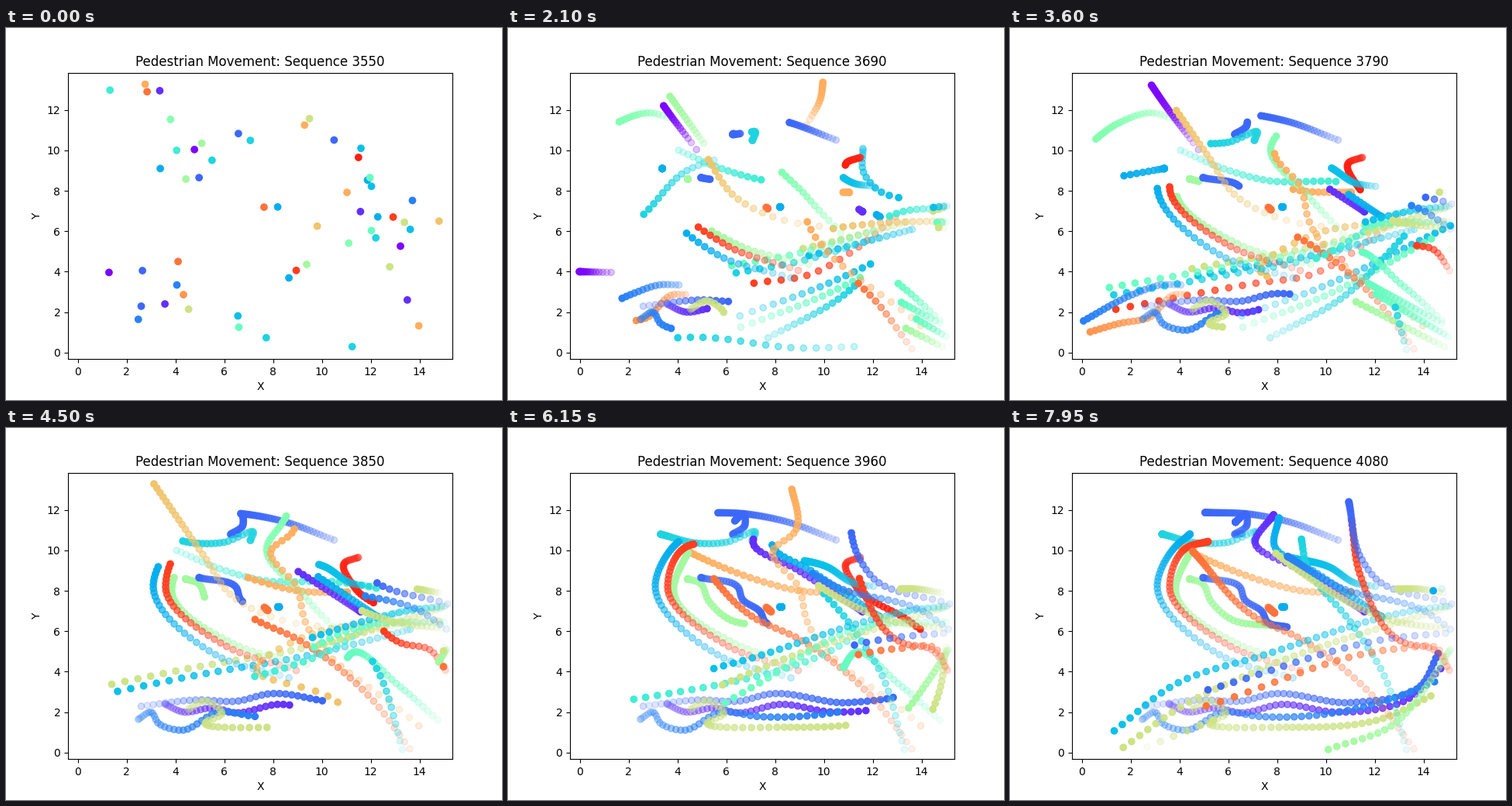
A matplotlib script that plays this animation: 640x480 px, repeating every 8 s.

```python
import numpy as np
import matplotlib.pyplot as plt
from matplotlib.animation import FuncAnimation

STEP_FRAMES = 3          # animation frames per data step
FRAMES, INTERVAL = 160, 50
LAST = 53                # final data step

# Positions on the rainbow colormap
PURPLE, INDIGO, BLUE, ROYAL = .01, .06, .135, .17
AZURE, SKY, CYAN, TURQ = .24, .27, .31, .375
MINT, SPRING, GREEN, LIME = .45, .51, .57, .65
KHAKI, ORANGE, APRICOT, CORAL = .72, .76, .8, .85
TOMATO, RED = .92, .96

walkers = []


def curve(points, u):
    """Smooth path through the points; u in 0..1 is the share of its length."""
    chord = np.r_[0, np.cumsum(np.hypot(*np.diff(points, axis=0).T))]
    slope = np.gradient(points, chord, axis=0)
    s = u * chord[-1]
    i = np.clip(np.searchsorted(chord, s, side="right") - 1, 0, len(chord) - 2)
    h = (chord[i + 1] - chord[i])[:, None]
    v = (s - chord[i])[:, None] / h
    return (points[i] * (1 + 2 * v) * (1 - v) ** 2 + h * slope[i] * v * (1 - v) ** 2
            + points[i + 1] * v * v * (3 - 2 * v) + h * slope[i + 1] * v * v * (v - 1))


def walk(tone, first, last, *points, gain=1, brake=1, moving=None):
    """Add a walker seen from first to last step.

    gain speeds the walker up, brake slows it down; with moving=(a, b) it
    stands, eases along the path between steps a and b, and stands again.
    """
    step = np.arange(first, last + 1)
    if moving:
        u = np.clip((step - moving[0]) / (moving[1] - moving[0]), 0, 1)
        u = u * u * (3 - 2 * u)
    else:
        u = 1 - (1 - ((step - first) / (last - first)) ** gain) ** brake
    walkers.append((first, curve(np.array(points, float), u), plt.cm.rainbow(tone)))


def group(members, first, last, *points, **timing):
    """Walkers side by side: the same path shifted by (dx, dy) for each."""
    for tone, dx, dy in members:
        walk(tone, first, last, *[(x + dx, y + dy) for x, y in points], **timing)


def leave(tone, x, y, steps=4, speed=.3):
    """Straight away from the middle of the square."""
    away = np.array([x - 7.5, y - 6.5])
    away *= steps * speed / np.hypot(*away)
    walk(tone, 0, steps, (x, y), (x + away[0], y + away[1]))


# Gone within moments
leave(TURQ, 1.32, 12.98)
leave(ORANGE, 2.76, 13.27)
leave(ROYAL, 13.71, 7.52)
leave(PURPLE, 13.22, 5.26)
leave(BLUE, 2.65, 4.05)
leave(INDIGO, 13.5, 2.6)

# Upper left
walk(CORAL, 0, 11, (2.84, 12.9), (2.52, 13.48), brake=2)
walk(INDIGO, 0, 11, (3.36, 12.95), (3.26, 13.5), brake=2)
walk(SPRING, 0, 27, (3.8, 11.53), (2.95, 11.85), (1.48, 11.33), (.3, 10.3), gain=.85)
walk(TURQ, 0, 39, (4.05, 10), (5.73, 9.13), (7.54, 8.52), (10.5, 8.45), (15, 7.4), gain=1.1)
walk(PURPLE, 0, 27, (4.78, 10.04), (3.38, 12.3), (2.7, 13.5), gain=.7)
walk(GREEN, 0, 19, (5.08, 10.35), (3.2, 13.5))
walk(CYAN, 0, 22, (5.5, 9.51), (4.55, 9.1), (2.52, 6.73), (.6, 5), gain=1.15)
walk(GREEN, 0, LAST, (4.43, 8.58), (4.9, 8.4), (5.28, 7.5), (6.1, 6.6), (8.05, 6.26),
     moving=(18, LAST))
walk(BLUE, 0, LAST, (4.97, 8.65), (6.5, 8.15), (6.65, 7.6), (7.4, 6.95), (7.6, 6.45),
     (8.4, 6.2), moving=(6, LAST))
walk(AZURE, 0, 29, (3.38, 9.1), (.6, 8.5), moving=(15, 31))
walk(BLUE, 0, LAST, (6.58, 10.83), (6.27, 10.78), (6.75, 11.2), (6.7, 11.8), (6.3, 11.4),
     moving=(0, 46))
walk(CYAN, 0, LAST, (7.07, 10.49), (7.2, 10.87), (6, 10.4), (4.78, 10.36), (3.3, 10.8),
     moving=(4, 42))

# Upper right
walk(ORANGE, 0, 16, (9.29, 11.25), (9.86, 12.55), (9.98, 13.6), gain=.75)
walk(LIME, 0, 11, (9.49, 11.57), (10.1, 12.8), gain=.7)
walk(BLUE, 0, LAST, (10.5, 10.51), (8.37, 11.45), (6.81, 11.8), (5.05, 11.87), brake=1.5)
walk(SKY, 0, 18, (11.6, 10.1), (11.63, 8.9), (12.1, 8.15), (15, 7.4), gain=1.8)
walk(RED, 0, 47, (11.5, 9.65), (10.94, 9.4), (11.32, 8.2), (13.38, 6.6), (14.2, 5.95),
     (15.3, 5.8), gain=1.75)
group([(AZURE, 0, 0), (MINT, .1, .12)], 0, 10, (11.87, 8.53), (14.85, 7.5))
walk(SKY, 0, LAST, (12.03, 8.22), (11.28, 8.35), (10.1, 9.2), (8.5, 9.65), gain=.8)
walk(ORANGE, 0, LAST, (11.03, 7.92), (9, 8), (7.5, 8.45), (5.25, 9.48), (4.1, 10.15),
     moving=(10, 47))

# Centre
walk(CORAL, 0, LAST, (7.63, 7.19), (7.9, 6.9))
walk(AZURE, 0, LAST, (8.19, 7.2), (8.3, 7.2))
walk(KHAKI, 0, 31, (9.81, 6.25), (8.8, 6.42), (6.3, 7.77), (5.22, 9.63), (3, 13.5), gain=.72)
walk(INDIGO, 0, LAST, (11.58, 6.97), (8.9, 9.05), (7.1, 10.4), (7.86, 11.76),
     moving=(10, LAST))
walk(AZURE, 0, LAST, (12.29, 6.71), (9.4, 9.05), (7.9, 10.2), (8.08, 11.6),
     moving=(10, LAST))
walk(TOMATO, 0, 25, (12.92, 6.7), (11.1, 4.95), (9.4, 3.85), (7.19, 3.44), (.8, 2), gain=1.15)
group([(LIME, 0, 0), (SKY, .24, -.35)], 0, 32, (13.38, 6.44), (9.48, 5.23), (4.4, 4.12),
      (.3, 3.1), gain=1.35)
walk(KHAKI, 0, 37, (14.8, 6.5), (12.1, 6.38), (9.66, 5.9), (7.3, 4.1), (10.3, 2.75),
     (13.15, -.3), gain=1.3)
group([(MINT, 0, 0), (CYAN, .18, -.36)], 0, 25, (12.03, 6.03), (9.03, 4.93), (6.14, 4.28),
      (.6, 3.1), gain=1.15)
walk(SPRING, 0, 40, (11.1, 5.41), (9.29, 7.73), (7.75, 10.2), (8.4, 11.4), (9.2, 13.3), gain=.72)
walk(LIME, 0, 10, (12.78, 4.24), (12.87, 4.25))
walk(GREEN, 0, LAST, (9.38, 4.36), (6.43, 5.35), (3.85, 8), (4.4, 9.8), (4.65, 10.3), brake=2)
walk(TOMATO, 0, LAST, (8.95, 4.06), (6.02, 5.3), (3.6, 8.2), (4.4, 10.2), (5.17, 10.43), brake=2)
walk(AZURE, 0, LAST, (8.65, 3.69), (5.7, 4.8), (3.1, 8.4), (3.85, 10.2), (4.43, 10.8), brake=2)

# Lower left
walk(PURPLE, 0, 18, (1.28, 3.96), (-.05, 4), brake=2.5)
walk(CORAL, 0, 8, (4.11, 4.5), (2, 4.1), (-.05, 3.38))
walk(ROYAL, 0, 25, (4.06, 3.34), (3.3, 3.35), (2.24, 2.94), (-.1, 1.45), gain=1.1)
walk(INDIGO, 0, LAST, (3.57, 2.4), (4.25, 2.02), (5.6, 2.2), (6.4, 1.97), (8.2, 2.38),
     (10.4, 2), (13.3, 2.6), (14.7, 4.15), gain=1.45)
walk(APRICOT, 0, 25, (4.33, 2.86), (3.9, 2.88), (2.7, 1.7), (1.6, 1.45), (.15, .95), gain=1.1)
walk(BLUE, 0, LAST, (2.6, 2.29), (4.87, 2.6), (6.6, 2.55), (7.7, 2.88), (11.06, 2.47),
     (13.87, 3.28), (14.6, 4.9))
walk(ROYAL, 0, LAST, (2.48, 1.64), (3, 2), (3.3, 1.45), (4.2, 1.1), (5.8, 2), (7.3, 1.78),
     (12.45, 2.55), (14.45, 3.5), gain=1.5)
walk(LIME, 0, LAST, (4.54, 2.14), (5.2, 2.55), (5.9, 1.9), (5.3, 1.55), (8.4, 1.25),
     (12.43, 1.72), (14.3, 2.8), gain=1.5)
walk(SKY, 0, 24, (6.56, 1.81), (9.6, 3.13), (15.1, 6.27), gain=.9)
walk(MINT, 0, 25, (6.6, 1.25), (9.92, 2.78), (14.6, 5.8), gain=.9)
walk(CYAN, 0, 25, (7.72, .73), (10.66, 2.7), (13.4, 6))
walk(CYAN, 0, 21, (11.24, .29), (9, .22), (5, .75), (.4, .3))
walk(ORANGE, 0, 49, (13.97, 1.32), (9.28, 6.6), (9, 8.1), (7.92, 10), (8.8, 10.9),
     (8.62, 13.5), brake=1.9)

# From the lower right corner
walk(CORAL, 4, LAST, (13.6, .18), (12, 2.7), (9, 5.6), (7.1, 6.7), (4.55, 9.95), brake=1.5)
walk(MINT, 5, 41, (14.75, 1.6), (13.16, 3.3), (11.2, 4.9), (10.8, 4.2), brake=2)
walk(MINT, 5, 29, (14.75, 1.45), (11.3, 3.7), brake=1.3)
walk(GREEN, 7, 27, (14.85, .28), (10.6, 2.9))
walk(MINT, 7, 29, (15, .8), (11.2, 3.5))
walk(CYAN, 19, LAST, (13.3, .15), (12.35, 3.9), (11.1, 6.3), (9.15, 9.5), (9, 10.55), brake=1.3)

# From the right edge
walk(TURQ, 5, 46, (14.85, 7.13), (13.57, 7.05), (9.8, 4.75), (-.24, 2.07), gain=1.3)
walk(LIME, 11, LAST, (15, 7.2), (7.5, 4.2), (4.06, 2.25), (1.7, .25), gain=1.25)
walk(MINT, 12, 48, (15, 6.45), (11.7, 6.25), (7.38, 3.45), (3.4, .6), gain=1.25)
walk(SKY, 11, LAST, (15.05, 7.25), (14.3, 7.15), (7.4, 4.8), (3.87, 3.4), (1.33, 1.07), gain=1.25)
walk(LIME, 13, LAST, (14.9, 6.15), (13.2, 6.4), (8.6, 9.25), (7.95, 9.85))
walk(TOMATO, 16, LAST, (15.07, 4.05), (14.4, 5.1), (13.27, 5.4), (11.4, 8.8), (11.05, 11.5))
walk(ROYAL, 18, LAST, (15.1, 6.1), (14.1, 6.95), (10.5, 8.2), (8.43, 9.7), brake=1.6)
walk(BLUE, 21, LAST, (15.15, 7.35), (12, 8.65), (11.45, 9.6), (10.94, 12.4), brake=1.6)
walk(LIME, 23, LAST, (14.8, 7.9), (13.7, 8.1), (12.95, 8.08), brake=2.5)
walk(GREEN, 24, LAST, (15.1, 5.1), (14.36, 3.7), (12.7, 1.33), (10.1, .15), gain=1.5)
walk(LIME, 29, 48, (15, 5.2), (14.8, 3.35), (13.7, .1), gain=1.15)
walk(CORAL, 29, LAST, (15.05, 4.1), (14.5, 5.2), (13.15, 5.15), (5.1, 2.3), gain=1.35)
walk(BLUE, 33, LAST, (14.9, 5.9), (13.03, 5.7), (5.17, 3.1), gain=1.1)
walk(GREEN, 45, 48, (3.84, .28), (1.6, .8))
walk(LIME, 48, LAST, (2.67, .28), (5.4, 1.6))
walk(AZURE, 52, LAST, (14.75, 8.1), (14.4, 8))

fig, ax = plt.subplots(figsize=(6.4, 4.8), dpi=100)
ax.set(xlim=(-.4, 15.347), ylim=(-.326, 13.844), xlabel="X", ylabel="Y")
title = ax.set_title("")
dots = ax.scatter([0], [0])


def trails(step):
    """Positions and fading colours of everyone present at a step."""
    for first, path, color in walkers:
        count = step - first + 1
        if not 1 <= count <= len(path):
            continue
        points = path[:count]
        if first == 0:  # the opening position counts twice
            points = np.vstack([path[:1], points])
        rgba = np.tile(color, (len(points), 1))
        rgba[:, 3] = np.linspace(.1, 1, len(points))
        yield points, rgba


def update(frame):
    step = frame // STEP_FRAMES
    points, colors = zip(*trails(step))
    dots.set_offsets(np.vstack(points))
    dots.set_facecolor(np.vstack(colors))
    title.set_text(f"Pedestrian Movement: Sequence {3550 + 10 * step}")
    return dots, title


anim = FuncAnimation(fig, update, frames=FRAMES, interval=INTERVAL,
                     repeat=True, repeat_delay=0, blit=False)
plt.show()
```
